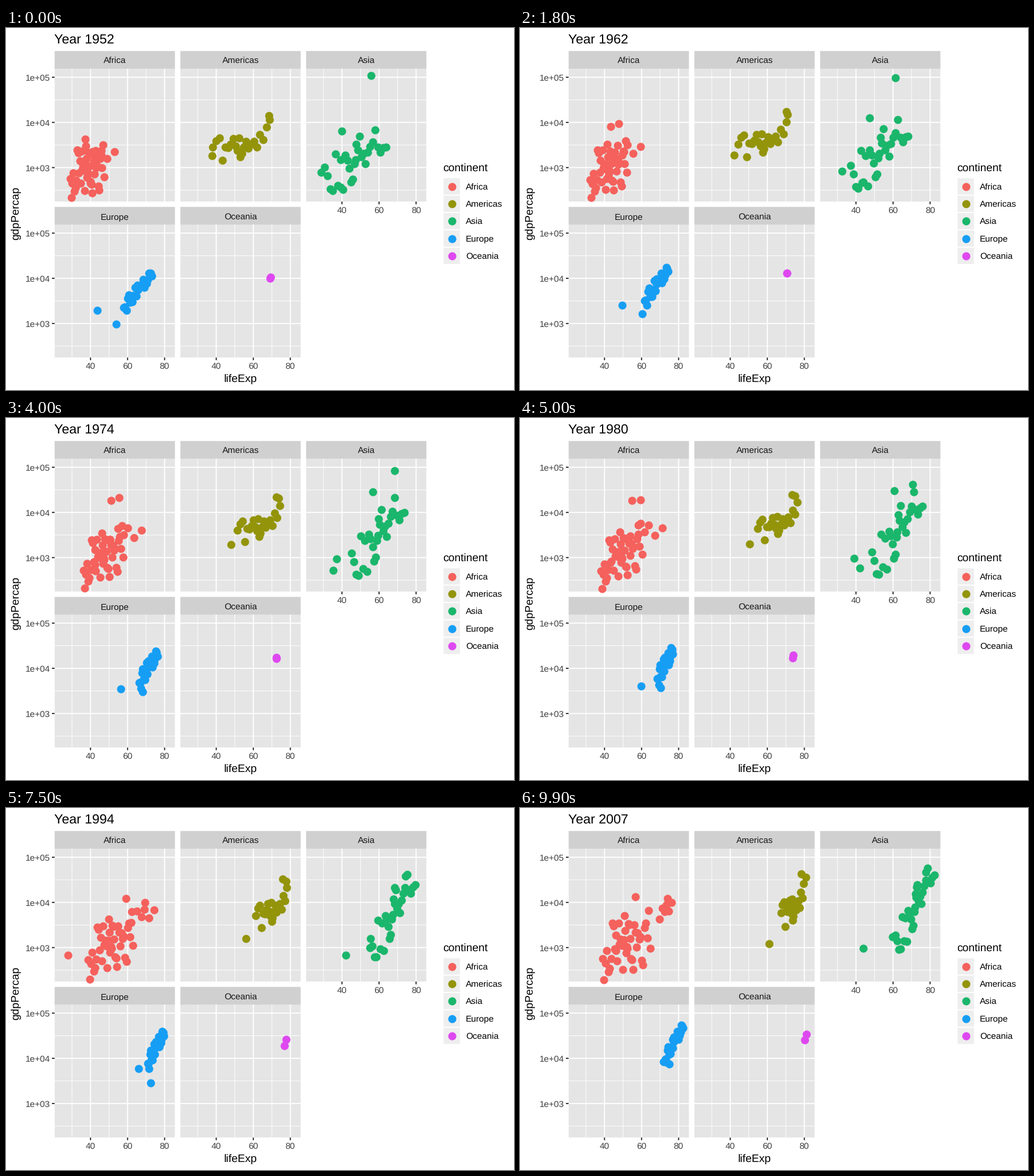
A matplotlib script for the animation above (10 s loop, 885 px wide and 632 px high).

```python
import numpy as np
import matplotlib.pyplot as plt
from matplotlib.animation import FuncAnimation
from matplotlib.patches import Rectangle

W, H, DPI = 885, 632, 100
PT = 72 / DPI
FRAMES = 100
YEARS = np.linspace(1952, 2007, FRAMES)
PW, PH, STRIP = 209.4, 232, 30.7
LEFT, TOP = (84.8, 303.85, 522.9), (71, 343.2)
rng = np.random.default_rng(7)


def path(*points):
    """One country's track through a few (year, life, GDP) points."""
    year, life, gdp = np.transpose(points)
    return np.stack([np.interp(YEARS, year, life),
                     np.interp(YEARS, year, np.log10(gdp))])[None]


def cloud(n, *stages):
    """A drifting cloud of n countries, evenly spread around its centre.

    The stages for 1952, 1982 and 2007 hold: mean life, its spread,
    mean log GDP, its rise with life, and its scatter.
    """
    s = np.linspace(-1, 1, n)
    rank = 1.95 * np.sign(s) * np.abs(s) ** 1.3
    noise = rng.permutation(rank)
    life, spread, gdp, rise, scatter = (
        np.interp(YEARS, (1952, 1982, 2007), p) for p in np.transpose(stages))
    return np.stack([life + np.outer(rank, spread),
                     gdp + np.outer(rank, rise) + np.outer(noise, scatter)],
                    axis=1)


africa = [
    cloud(43, (38.2, 4.7, 2.94, 0.03, 0.28), (50, 5.8, 3.06, 0.12, 0.27),
          (51.8, 6.6, 3.07, 0.08, 0.33)),
    cloud(6, (45, 4, 3.28, 0.08, 0.08), (64, 4.5, 3.63, 0.08, 0.1),
          (73, 1.7, 3.84, 0.12, 0.08)),
    path((1952, 42.7, 2388), (1967, 50.2, 18773), (1977, 57.4, 21951),
         (1992, 68.8, 9640), (2007, 74, 12057)),
    path((1952, 37, 4293), (1977, 52.8, 21746), (1987, 60.2, 11864),
         (2007, 56.7, 13206)),
    path((1952, 40, 493), (1987, 44, 848), (1992, 23.6, 737),
         (1997, 36.1, 590), (2007, 46.2, 863)),
]
americas = [
    cloud(22, (52.6, 7.4, 3.51, 0.09, 0.14), (66.5, 5.3, 3.8, 0.13, 0.13),
          (73.5, 3.1, 3.91, 0.14, 0.16)),
    path((1952, 68.4, 13990), (2007, 78.2, 42952)),
    path((1952, 68.8, 11367), (1977, 74.2, 22091), (2007, 80.7, 36319)),
    path((1952, 37.6, 1840), (1982, 51.5, 2011), (2007, 60.9, 1202)),
]
asia = [
    cloud(29, (47.2, 8.5, 3.16, 0.23, 0.24), (63.5, 6.9, 3.58, 0.4, 0.26),
          (71.7, 5.4, 3.88, 0.44, 0.2)),
    path((1952, 55.6, 108382), (1957, 58, 113523), (1967, 64.6, 80895),
         (1972, 67.7, 109348), (1982, 71.3, 31354), (2007, 77.6, 47307)),
    path((1952, 39.9, 6460), (1977, 58.7, 34168), (1987, 66.3, 21198),
         (2007, 72.8, 21655)),
    path((1952, 39.4, 368), (1967, 45.4, 523), (1977, 31.2, 525),
         (1982, 51, 624), (2007, 59.7, 1714)),
    path((1952, 28.8, 779), (1982, 39.9, 978), (1992, 41.7, 649),
         (2007, 43.8, 975)),
]
europe = [
    cloud(28, (65.5, 3.9, 3.74, 0.2, 0.07), (73.2, 2, 4.12, 0.17, 0.1),
          (77.5, 2.5, 4.36, 0.2, 0.07)),
    path((1952, 43.6, 1969), (1982, 61, 4241), (2007, 71.8, 8458)),
    path((1952, 53.8, 974), (1977, 69.9, 3528), (1987, 71.1, 4314),
         (1992, 72.2, 2547), (2007, 74.9, 7446)),
]
oceania = [
    path((1952, 69.1, 10040), (1972, 71.9, 16789), (2007, 81.2, 34435)),
    path((1952, 69.4, 10557), (1972, 71.9, 16046), (1992, 76.3, 18363),
         (2007, 80.2, 25185)),
]

PANELS = [
    ("Africa", "#f5615c", africa),
    ("Americas", "#939409", americas),
    ("Asia", "#1ab66b", asia),
    ("Europe", "#169ef4", europe),
    ("Oceania", "#de48f0", oceania),
]

plt.rcParams["font.family"] = "Liberation Sans"
plt.rcParams["text.hinting"] = "none"
fig = plt.figure(figsize=(W / DPI, H / DPI), dpi=DPI, facecolor="white")
ax = fig.add_axes([0, 0, 1, 1])
ax.set(xlim=(0, W), ylim=(H, 0))
ax.axis("off")


def px(left, life):
    return left + (life - 20.65) * 3.227


def py(top, log_gdp):
    return top + PH - (log_gdp - 2.248) * 78.88


def rect(x, y, w, h, color):
    ax.add_patch(Rectangle((x, y), w, h, fc=color, lw=0, zorder=0, snap=False))


def line(xs, ys, width, color="white", z=1):
    ax.plot(xs, ys, color=color, lw=width * PT, solid_capstyle="butt",
            zorder=z, snap=False)


def text(x, y, s, size, color="black", ha="left", va="baseline", rotation=0):
    return ax.text(x, y, s, fontsize=size * PT, color=color, ha=ha, va=va,
                   rotation=rotation)


def dots(color, xs=(), ys=()):
    return ax.scatter(xs, ys, s=(14.1 * PT) ** 2, c=color, lw=0, zorder=3)


def draw_panel(name, left, top, y_axis, x_axis):
    right, bottom = left + PW, top + PH
    rect(left, top - STRIP, PW, PH + STRIP, "#e5e5e5")
    rect(left, top - STRIP, PW, STRIP, "#d0d0d0")
    text(left + PW / 2, top - 8.8, name, 15.4, "#151515", "center")

    for width, lives, powers, z in ((0.95, (30, 50, 70), (2.5, 3.5, 4.5), 1),
                                    (1.9, (40, 60, 80), (3, 4, 5), 2)):
        for life in lives:
            line([px(left, life)] * 2, [top, bottom], width, z=z)
        for power in powers:
            line([left, right], [py(top, power)] * 2, width, z=z)

    if y_axis:
        for power in (3, 4, 5):
            y = py(top, power)
            line([left - 4.8, left], [y, y], 1.9, "#272727")
            text(left - 8, y + 5.7, f"1e+0{power}", 15.4, "#404040", "right")
    if x_axis:
        for life in (40, 60, 80):
            x = px(left, life)
            line([x, x], [bottom, bottom + 4.8], 1.9, "#272727")
            text(x, bottom + 20, str(life), 15.4, "#404040", "center")


title = text(84.5, 26.5, "", 23.1)
text(408.5, 618, "lifeExp", 19.3, ha="center")
text(17.5, 323, "gdpPercap", 19.3, ha="center", va="center", rotation=90)
text(761, 249.5, "continent", 19.3)

moving = []
for i, (name, color, parts) in enumerate(PANELS):
    row, col = divmod(i, 3)
    left, top = LEFT[col], TOP[row]
    draw_panel(name, left, top, y_axis=col == 0, x_axis=i >= 2)
    tracks = np.concatenate(parts)
    where = np.stack([px(left, tracks[:, 0]), py(top, tracks[:, 1])], axis=-1)
    moving.append((dots(color), where))

    cy = 276.6 + 30.3 * i
    rect(762.4, cy - 14.2, 28.4, 28.4, "#eeeeee")
    dots(color, [776.6], [cy])
    text(801, cy + 5.8, name, 15.4)


def update(i):
    title.set_text(f"Year {round(YEARS[i])}")
    for group, where in moving:
        group.set_offsets(where[:, i])
    return [title] + [group for group, _ in moving]


anim = FuncAnimation(fig, update, frames=FRAMES, interval=100,
                     repeat=True, repeat_delay=0)
plt.show()
```
